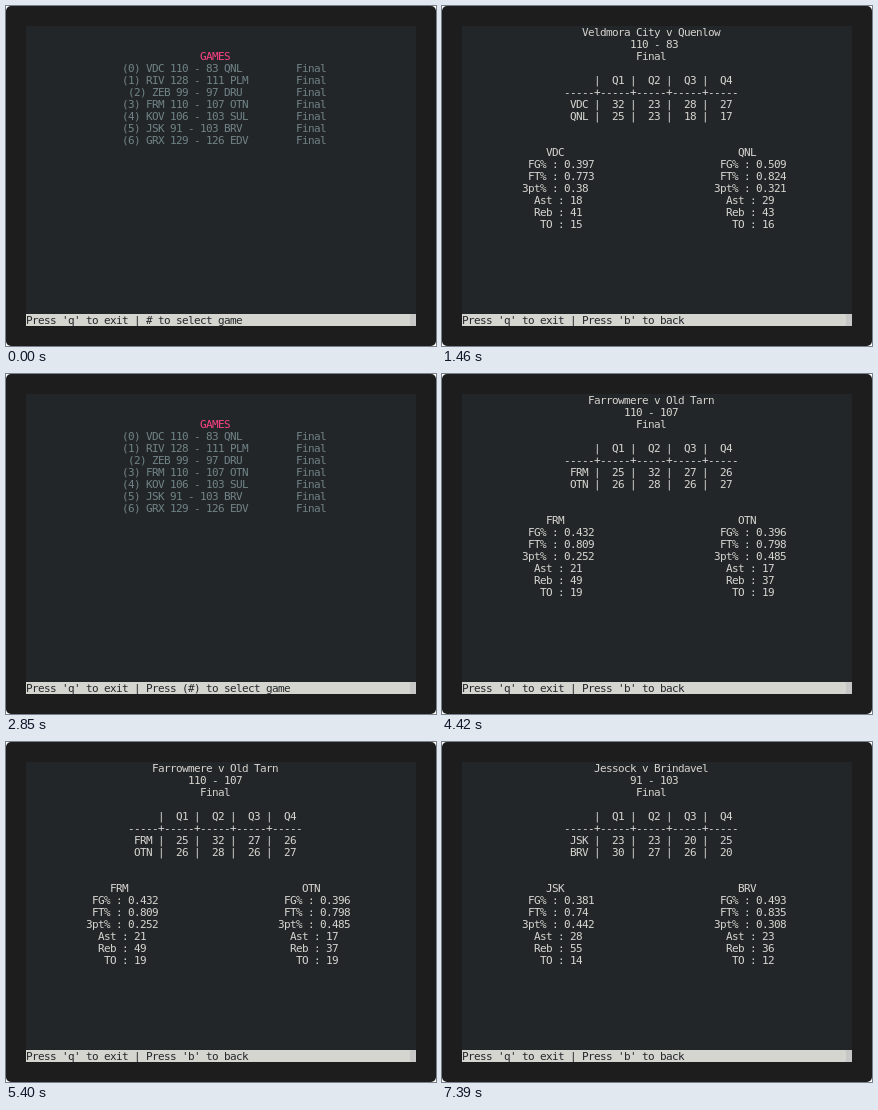
An HTML page that plays this animation: 430 px wide and 340 px high, repeating every 8000 ms.

```html
<!DOCTYPE html>
<html lang="en">
<head>
<meta charset="utf-8">
<title>Scores in a terminal</title>
<style>
  html, body { margin: 0; width: 100%; height: 100%; overflow: hidden; background: #fff; }
  #frame { position: absolute; width: 430px; height: 340px; border-radius: 5px; background: #1d1d1d; }
  #term {
    position: absolute; left: 20px; top: 20px; width: 390px; height: 300px;
    background: #232628; color: #d5d5d0;
    font: 11px/13px "DejaVu Sans Mono", monospace; letter-spacing: -0.62px;
  }
  #bar { position: absolute; top: 288px; width: 384px; height: 12px; background: #d5d5d0; border-right: 6px solid #c7c7c7; }
  .screen { position: absolute; inset: 0; visibility: hidden; }
  .screen span { position: absolute; white-space: pre; }
  .dim { color: #708387; }
  .title { color: #fc4384; }
  .status { color: #232628; }
</style>
</head>
<body>
<div id="frame"><div id="term"><div id="bar"></div></div></div>
<script>
const LOOP = 8000, CELL_W = 6, CELL_H = 12;
const term = document.getElementById('term');

const games = [
  'VDC 110 - 83 QNL', 'RIV 128 - 111 PLM', 'ZEB 99 - 97 DRU', 'FRM 110 - 107 OTN',
  'KOV 106 - 103 SUL', 'JSK 91 - 103 BRV', 'GRX 129 - 126 EDV'
];

// Label, lowest and highest value, decimals.
const statRules = [
  [' FG%', 0.33, 0.51, 3], [' FT%', 0.71, 0.85, 3], ['3pt%', 0.18, 0.5, 3],
  ['Ast', 16, 30, 0], ['Reb', 34, 55, 0], [' TO', 10, 20, 0]
];

function seededRandom(seed) {
  return () => {
    const x = Math.sin(++seed * 12.9898) * 43758.5453;
    return x - Math.floor(x);
  };
}

// Three quarters near a fourth of the score; the last takes the rest.
function splitScore(score, random) {
  const quarters = Array.from({ length: 3 }, () => Math.round(score * (0.2 + 0.1 * random())));
  return [...quarters, score - quarters.reduce((sum, q) => sum + q)];
}

function put(screen, row, col, text, kind = '') {
  const span = document.createElement('span');
  span.textContent = text;
  span.className = kind;
  span.style.left = col * CELL_W + 'px';
  span.style.top = row * CELL_H + 'px';
  screen.append(span);
}

function center(screen, row, middle, text, kind) {
  put(screen, row, middle - Math.ceil(text.length / 2), text, kind);
}

function newScreen(status) {
  const screen = document.createElement('div');
  screen.className = 'screen';
  put(screen, 24, 0, "Press 'q' to exit | " + status, 'status');
  term.append(screen);
  return screen;
}

function listScreen(status) {
  const screen = newScreen(status);
  center(screen, 2, 32, 'GAMES', 'title');
  games.forEach((game, i) => {
    const line = `(${i}) ${game}`;
    put(screen, 3 + i, 26 - Math.floor(line.length / 2), line, 'dim');
    put(screen, 3 + i, 45, 'Final', 'dim');
  });
  return screen;
}

function tableRow(name, cells) {
  return [name, ...cells].map(cell => String(cell).padStart(4) + ' ').join('|');
}

function gameScreen(index, cities) {
  const screen = newScreen("Press 'b' to back");
  const random = seededRandom(index * 100);
  const [home, homeScore, , awayScore, away] = games[index].split(' ');

  center(screen, 0, 32, cities);
  center(screen, 1, 32, `${homeScore} - ${awayScore}`);
  center(screen, 2, 32, 'Final');
  put(screen, 4, 17, tableRow('', ['Q1', 'Q2', 'Q3', 'Q4']));
  put(screen, 5, 17, Array(5).fill('-----').join('+'));

  [[home, homeScore], [away, awayScore]].forEach(([team, score], side) => {
    const middle = 16 + side * 32;
    put(screen, 6 + side, 17, tableRow(team, splitScore(+score, random)));
    center(screen, 10, middle, team);
    statRules.forEach(([label, low, high, decimals], i) => {
      const value = +(low + (high - low) * random()).toFixed(decimals);
      center(screen, 11 + i, middle, `${label} : ${value}`);
    });
  });
  return screen;
}

const scenes = [
  [0, listScreen('# to select game')],
  [1460, gameScreen(0, 'Veldmora City v Quenlow')],
  [2850, listScreen('Press (#) to select game')],
  [4420, gameScreen(3, 'Farrowmere v Old Tarn')],
  [6050, listScreen('Press (#) to select game')],
  [7390, gameScreen(5, 'Jessock v Brindavel')]
];

// Each screen is visible only from its own start to the next one's.
scenes.forEach(([start, screen], i) => {
  const end = i + 1 < scenes.length ? scenes[i + 1][0] : LOOP;
  const key = (time, visibility) => ({ offset: time / LOOP, visibility, easing: 'step-end' });
  screen.animate([
    key(0, 'hidden'), key(start, 'hidden'), key(start, 'visible'),
    key(end, 'visible'), key(end, 'hidden'), key(LOOP, 'hidden')
  ], { duration: LOOP, iterations: Infinity }).startTime = 0;
});
</script>
</body>
</html>
```
